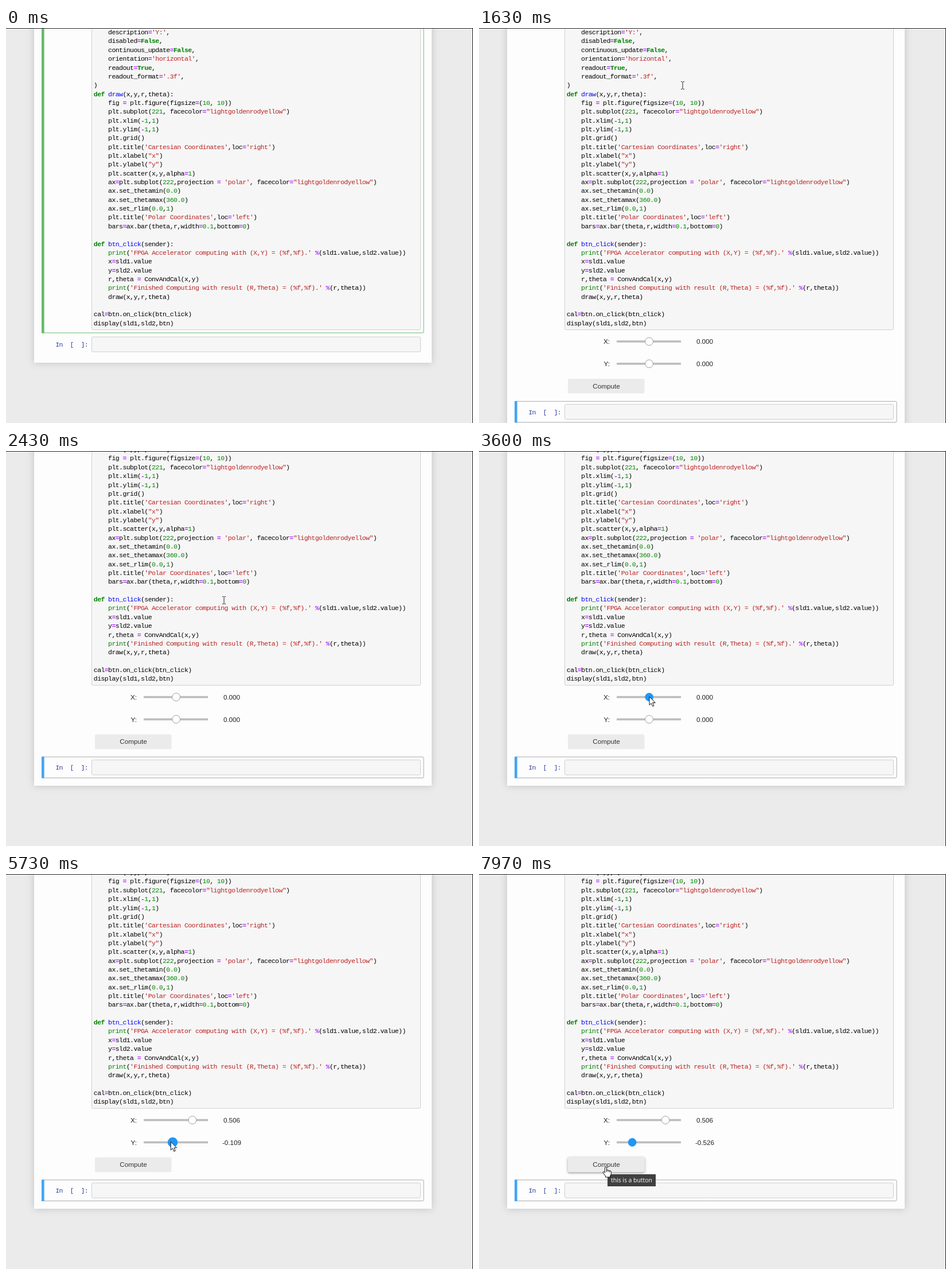
Write an HTML page with a canvas that moves like this. It is 814 px wide and 688 px high and loops after 8 s.

```html
<!DOCTYPE html>
<html lang="en">
<head>
<meta charset="utf-8">
<title>Notebook sliders</title>
<style>
  html, body { margin: 0; width: 100%; height: 100%; overflow: hidden; background: #ebebeb; }
  canvas { display: block; }
</style>
</head>
<body>
<canvas id="stage" width="814" height="688"></canvas>
<script>
const ctx = document.getElementById('stage').getContext('2d');
const LOOP = 8000, RUN_AT = 450, SCROLL = 117.4;
const CHAR = 6.325, LINE = 15.35;
const MONO = '11.5px "Liberation Mono", monospace';
const SANS = '11.7px "Liberation Sans", sans-serif';
const BLUE = '#2196f3';

const source = `    description='Y:',
    disabled=False,
    continuous_update=False,
    orientation='horizontal',
    readout=True,
    readout_format='.3f',
)
def draw(x,y,r,theta):
    fig = plt.figure(figsize=(10, 10))
    plt.subplot(221, facecolor="lightgoldenrodyellow")
    plt.xlim(-1,1)
    plt.ylim(-1,1)
    plt.grid()
    plt.title('Cartesian Coordinates',loc='right')
    plt.xlabel("x")
    plt.ylabel("y")
    plt.scatter(x,y,alpha=1)
    ax=plt.subplot(222,projection = 'polar', facecolor="lightgoldenrodyellow")
    ax.set_thetamin(0.0)
    ax.set_thetamax(360.0)
    ax.set_rlim(0.0,1)
    plt.title('Polar Coordinates',loc='left')
    bars=ax.bar(theta,r,width=0.1,bottom=0)

def btn_click(sender):
    print('FPGA Accelerator computing with (X,Y) = (%f,%f).' %(sld1.value,sld2.value))
    x=sld1.value
    y=sld2.value
    r,theta = ConvAndCal(x,y)
    print('Finished Computing with result (R,Theta) = (%f,%f).' %(r,theta))
    draw(x,y,r,theta)

cal=btn.on_click(btn_click)
display(sld1,sld2,btn)`;

// Each capture group of the pattern has its own colour and weight.
const pattern = /('[^']*'|"[^"]*")|\b(def|True|False)\b|\b(print)\b|(?<=def )(\w+)|(\b\d+(?:\.\d+)?)|([=%-])|\w+|[^\s\w]+?/g;
const styles = [['#ba2121', ''], ['#008000', 'bold '], ['#008000', ''], ['#0000ff', ''], ['#008800', ''], ['#aa22ff', 'bold ']];
const tokens = source.split('\n').flatMap((line, row) =>
  [...line.matchAll(pattern)].map(m => {
    const kind = m.slice(1).findIndex(Boolean);
    const [color, weight] = styles[kind] || ['#000', ''];
    return { text: m[0], col: m.index, row, color, weight };
  }));

const clamp = v => Math.max(0, Math.min(1, v));
function ease(t, from, to) {
  const p = clamp((t - from) / (to - from));
  return p < .5 ? 4 * p ** 3 : 1 - 4 * (1 - p) ** 3;
}

function rect(x, y, w, h, fill, stroke) {
  ctx.beginPath();
  ctx.roundRect(x, y, w, h, 2);
  if (fill) { ctx.fillStyle = fill; ctx.fill(); }
  if (stroke) { ctx.strokeStyle = stroke; ctx.lineWidth = 1; ctx.stroke(); }
}

function shadowed(blur, dy, color, draw) {
  ctx.save();
  ctx.shadowBlur = blur;
  ctx.shadowOffsetY = dy;
  ctx.shadowColor = color;
  draw();
  ctx.restore();
}

function label(text, x, y, align, color = '#222', font = SANS) {
  ctx.font = font;
  ctx.textAlign = align;
  ctx.fillStyle = color;
  ctx.fillText(text, x, y);
}

function mono(text, x, y, color, weight = '') {
  ctx.letterSpacing = '-0.576px';
  label(text, x, y, 'left', color, weight + MONO);
  ctx.letterSpacing = '0px';
}

function inputBox(y, h) { rect(149.5, y, 573, h, '#f6f6f6', '#cfcfcf'); }

function emptyCell(y) {
  inputBox(y + .5, 26);
  mono('In  [  ]:', 86.2, y + 17.8, '#303f9f');
}

function selection(y, h, border, bar) {
  rect(62.5, y, 665.5, h, null, border);
  ctx.fillStyle = bar;
  ctx.fillRect(62, y - .5, 4.6, h + 1);
}

function slider(name, y, value, filled, pressed) {
  const x = 296.6 + value * 56;
  label(name + ':', 228, y + 4.2, 'right');
  ctx.fillStyle = '#bdbdbd';
  ctx.fillRect(240, y - 1.8, 112, 3.6);
  ctx.beginPath();
  ctx.arc(x, y, pressed ? 8.3 : 6.9, 0, 2 * Math.PI);
  ctx.fillStyle = filled ? BLUE : '#fff';
  ctx.strokeStyle = filled ? BLUE : '#9e9e9e';
  ctx.lineWidth = 1;
  ctx.fill();
  ctx.stroke();
  label((value || 0).toFixed(3), 393.5, y + 4.2, 'center');
}

function button(y, hover) {
  const face = () => rect(155, y, 133.5, 25.6, '#ebebeb');
  if (hover) {
    shadowed(5, 1, 'rgba(0,0,0,.3)', face);
    shadowed(2, 2, 'rgba(0,0,0,.16)', face);
  }
  face();
  label('Compute', 222, y + 16.6, 'center', '#333');
}

function shape(path, x, y, fill, stroke) {
  ctx.save();
  ctx.translate(x, y);
  const p = new Path2D(path);
  ctx.lineWidth = 1;
  ctx.lineJoin = 'round';
  if (fill) { ctx.fillStyle = fill; ctx.fill(p); }
  ctx.strokeStyle = stroke;
  ctx.stroke(p);
  ctx.restore();
}

const cursors = {
  beam: (x, y) => shape('M-3-6.5H-1L0-5.5L1-6.5H3M0-5.5V5.5M-3 6.5H-1L0 5.5L1 6.5H3', x, y, null, '#222'),
  arrow: (x, y) => shape('M0 0V14.5L3.3 11.4L5.6 16.7L8 15.7L5.7 10.5H10.3Z', x, y, '#fff', '#111'),
  hand: (x, y) => shape('M-1.5 1Q0-1 1.5 1V6Q3 4.7 4.2 6.3Q5.8 5.2 6.8 7Q8.8 6.2 9.3 8.5V13L7.5 16V18H-.5V16L-4.7 10.5Q-5.2 8-3 8.7L-1.5 10.3ZM1.5 6V9M4.2 6.3V9M6.8 7V9.5', x, y, '#fff', '#111')
};

// Pointer moves: start, end, dx, dy
const moves = [
  [1700, 1900, 25, 160], [2850, 3430, -83, 168], [3800, 4300, 28.3, 1],
  [4650, 5150, -32, 37], [5613, 5930, -29.5, 2], [6650, 7230, -42.8, 42]
];
function pointer(t) {
  return moves.reduce(([x, y], [from, to, dx, dy]) => {
    const p = ease(t, from, to);
    return [x + dx * p, y + dy * p];
  }, [355, 100]);
}

function drawNotebook(t, hoverButton) {
  const ran = t >= RUN_AT;
  const bottom = ran ? 583 + SCROLL : 583;
  shadowed(12, 0, 'rgba(87,87,87,.28)', () => {
    ctx.fillStyle = '#fdfdfd';
    ctx.fillRect(49, -60, 693, bottom + 60);
  });

  if (!ran) selection(-60.5, 591.5, '#66bb6a', '#66bb6a');
  inputBox(-60.5, 586);
  for (const k of tokens)
    mono(k.text, 152.8 + k.col * CHAR, 11.1 + k.row * LINE, k.color, k.weight);

  if (!ran) return emptyCell(537.5);
  const x = .506 * ease(t, 3800, 4300);
  const y = -.526 * ease(t, 5613, 5930);
  slider('X', 546, x, t >= 3400 && t < 5400, t >= 3700 && t < 4500);
  slider('Y', 584.8, y, t >= 5100, t >= 5400 && t < 6400);
  button(611, hoverButton);
  selection(650.3, 36.5, '#ababab', '#42a5f5');
  emptyCell(655);
}

function draw(t) {
  const [px, py] = pointer(t);
  const hoverButton = py > 494 && py < 520;
  ctx.fillStyle = '#ebebeb';
  ctx.fillRect(0, 0, 814, 688);

  ctx.save();
  ctx.translate(0, -SCROLL * ease(t, 1900, 2191));
  drawNotebook(t, hoverButton);
  ctx.restore();

  ctx.fillStyle = '#222';
  ctx.fillRect(0, 0, 814, 1);
  ctx.fillRect(813, 0, 1, 688);

  if (t >= 7800) {
    ctx.fillStyle = '#404040';
    ctx.fillRect(224, 523, 84, 21);
    label('this is a button', 230, 537.3, 'left', '#fff', '10.4px "Open Sans", sans-serif');
  }
  if (t >= 1200) cursors[hoverButton ? 'hand' : py < 408 ? 'beam' : 'arrow'](px, py);
}

function frame() {
  draw(performance.now() % LOOP);
  requestAnimationFrame(frame);
}
frame();
</script>
</body>
</html>
```
